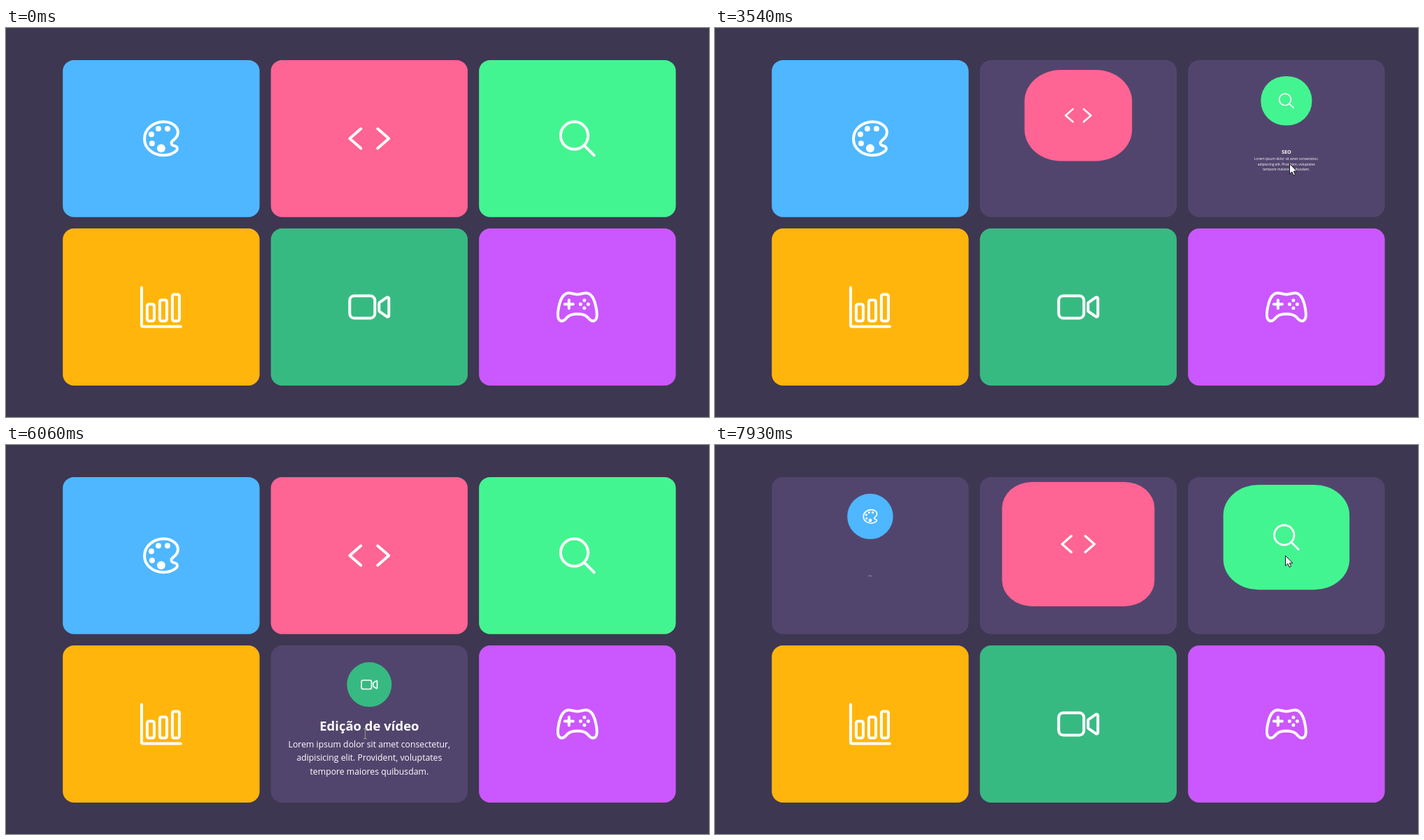
An HTML page with a canvas that plays this animation: 1005 by 557 pixels, repeating every 8 s.

```html
<!DOCTYPE html>
<html lang="pt-BR">
<head>
<meta charset="utf-8">
<title>Cards</title>
<style>
  html, body { margin: 0; width: 100%; height: 100%; overflow: hidden; background: #3e3751; }
  canvas { display: block; width: 1005px; height: 557px; }
</style>
</head>
<body>
<canvas id="stage"></canvas>
<script>
const W = 1005, H = 557, LOOP = 8000;
const DURATION = 500, DELAY = 250, GLIDE = 90;
const CARD_W = 281.3, CARD_H = 224.9, CIRCLE = 64;
const FONT = '"Open Sans", "Noto Sans", sans-serif';
const LINES = [
  'Lorem ipsum dolor sit amet consectetur,',
  'adipisicing elit. Provident, voluptates',
  'tempore maiores quibusdam.'
];

const canvas = document.getElementById('stage');
const ctx = canvas.getContext('2d');
const dpr = window.devicePixelRatio || 1;
canvas.width = W * dpr;
canvas.height = H * dpr;

// Icons are outlines and dots in a 512 unit box
function dots(r, ...centers) {
  const path = new Path2D();
  for (const [x, y] of centers) {
    path.moveTo(x + r, y);
    path.arc(x, y, r, 0, 2 * Math.PI);
  }
  return path;
}

function mirrored(d) {
  const half = new Path2D(d), path = new Path2D(half);
  path.addPath(half, new DOMMatrix([-1, 0, 0, 1, 512, 0]));
  return path;
}

function palette() {
  const line = new Path2D('M430 348c-16-15-31-5-47-19-14-13-14-31 0-44l30-27c46-41 46-108 0-149-34-30-80-45-128-45-56 0-114 20-158 60-83 74-83 195 0 268 42 37 98 55 154 55 56 0 111-18 149-52 14-13 12-36 0-47z');
  const fill = dots(32, [144, 208], [152, 311], [224, 144], [328, 144]);
  fill.addPath(dots(48, [256, 367]));
  return { line, fill };
}

function lens() {
  const line = dots(157, [221, 221]);
  line.moveTo(338, 338);
  line.lineTo(448, 448);
  return { line };
}

function chart() {
  const line = new Path2D('M32 32v432a16 16 0 0 0 16 16h432');
  [192, 240, 304].forEach((h, i) => line.roundRect(96 + 144 * i, 416 - h, 80, h, 20));
  return { line };
}

function camera() {
  const line = new Path2D('M375 309l83 58a16 16 0 0 0 22-15V160a16 16 0 0 0-22-15l-83 58a16 16 0 0 0-7 13v80a16 16 0 0 0 7 13z');
  line.roundRect(32, 128, 288, 256, 52);
  return { line };
}

function gamepad() {
  const line = mirrored('M256 112c27 0 69-16 96-16 60 0 97 65 115 153 19 86 20 151-21 165-25 8-49-10-71-38-25-31-55-40-119-40');
  line.addPath(new Path2D('M160 176v96M208 224h-96'));
  const ring = [0, 1, 2, 3].map(i => i * Math.PI / 2);
  return { line, fill: dots(20, ...ring.map(a => [336 + 44 * Math.cos(a), 224 + 44 * Math.sin(a)])) };
}

const cards = [
  { title: 'Design', color: '#4eb7ff', icon: palette() },
  { title: 'Desenvolvimento', color: '#fe6494', icon: { line: mirrored('M160 368L32 256l128-112') } },
  { title: 'SEO', color: '#43f590', icon: lens() },
  { title: 'Marketing Digital', color: '#ffb50b', icon: chart() },
  { title: 'Edição de vídeo', color: '#37ba82', icon: camera() },
  { title: 'Games', color: '#cb57ff', icon: gamepad() }
];

// Pointer tour: which card, how long, and where the pointer rests
const tour = [
  { card: 0, enter: 1010, leave: 2085, at: [250, 200] },
  { card: 1, enter: 2093, leave: 3165, at: [579, 196] },
  { card: 2, enter: 3169, leave: 4215, at: [821, 194] },
  { card: 5, enter: 4225, leave: 5170, at: [808, 376] },
  { card: 4, enter: 5185, leave: 6150, at: [514, 413] },
  { card: 3, enter: 6160, leave: 6905, at: [310, 340] },
  { card: 1, enter: 6925, leave: 7200, at: [500, 205] },
  { card: 0, enter: 7245, leave: 7690, at: [250, 166] },
  { card: 1, enter: 7710, leave: 7786, at: [540, 162] },
  { card: 2, enter: 7793, leave: LOOP, at: [815, 158] }
];
cards.forEach((card, i) => {
  card.left = 81.2 + 297.5 * (i % 3);
  card.top = i < 3 ? 45.9 : 287.1;
  card.cx = card.left + CARD_W / 2;
  card.visits = tour.filter(stop => stop.card === i);
});

const mix = (a, b, k) => a + (b - a) * k;
const clamp = k => Math.max(0, Math.min(1, k));

// CSS "ease": cubic-bezier(.25, .1, .25, 1)
function ease(x) {
  if (x <= 0 || x >= 1) return clamp(x);
  const curve = (u, a, b) => 3 * u * (1 - u) * ((1 - u) * a + u * b) + u ** 3;
  let lo = 0, hi = 1;
  for (let i = 0; i < 24; i++) {
    const mid = (lo + hi) / 2;
    if (curve(mid, 0.25, 0.25) < x) lo = mid; else hi = mid;
  }
  return curve(lo, 0.1, 1);
}

// Value of a hover transition; a reversed run is shortened as in CSS
function transition(visits, t, inDelay, outDelay) {
  let from = 0, to = 0, start = 0, factor = 1;
  const progress = s => ease((s - start) / Math.max(1, DURATION * factor));
  const toggle = (s, target, delay) => {
    const k = progress(s);
    from = mix(from, to, k);
    to = target;
    factor = k * factor + 1 - factor;
    start = s + delay;
  };
  for (const { enter, leave } of visits) {
    if (t >= enter) toggle(enter, 1, inDelay);
    if (t >= leave) toggle(leave, 0, outDelay);
  }
  return mix(from, to, progress(t));
}

function fillRound(x, y, w, h, rx, ry, color) {
  ctx.beginPath();
  ctx.roundRect(x, y, w, h, { x: rx, y: ry });
  ctx.fillStyle = color;
  ctx.fill();
}

function drawText(card, scale) {
  if (scale < 0.005) return;
  ctx.save();
  ctx.translate(card.cx, card.top + 141.5);
  ctx.scale(scale, scale);
  ctx.fillStyle = '#fff';
  ctx.textAlign = 'center';
  ctx.font = `700 18.5px ${FONT}`;
  ctx.fillText(card.title, 0, -19.5);
  ctx.font = `400 12.25px ${FONT}`;
  LINES.forEach((line, i) => ctx.fillText(line, 0, 4 + 19.5 * i));
  ctx.restore();
}

function drawIcon({ line, fill }, cx, cy, size) {
  ctx.save();
  ctx.translate(cx, cy);
  ctx.scale(size / 512, size / 512);
  ctx.translate(-256, -256);
  ctx.strokeStyle = ctx.fillStyle = '#fff';
  ctx.lineWidth = 32;
  ctx.lineCap = ctx.lineJoin = 'round';
  ctx.stroke(line);
  if (fill) ctx.fill(fill);
  ctx.restore();
}

function drawCard(card, t) {
  const { cx, top, color, icon, visits } = card;
  const open = transition(visits, t, 0, DELAY);
  fillRound(card.left, top, CARD_W, CARD_H, 16, 16, '#52456d');
  drawText(card, transition(visits, t, DELAY, 0));

  const w = mix(CARD_W, CIRCLE, open), h = mix(CARD_H, CIRCLE, open), y = top + 24 * open;
  const radius = side => mix(16, side / 2, open);
  fillRound(cx - w / 2, y, w, h, radius(w), radius(h), color);
  drawIcon(icon, cx, y + h / 2, mix(64, 25.6, open));
}

// Rest on each stop, glide between stops around the moment of leaving
function pointerAt(t) {
  if (t >= 660 && t < 730) return [14, 494];
  if (t < 1000) return null;
  const margin = stop => Math.min(GLIDE, (stop.leave - stop.enter) / 2);
  for (let i = 0; i < tour.length - 1; i++) {
    const a = tour[i], b = tour[i + 1];
    const depart = a.leave - margin(a), arrive = b.enter + margin(b);
    if (t < arrive) {
      const k = clamp((t - depart) / (arrive - depart));
      return a.at.map((v, axis) => mix(v, b.at[axis], k));
    }
  }
  return tour[tour.length - 1].at;
}

function overText([x, y], t) {
  return cards.some(({ cx, top, visits }) =>
    Math.abs(x - cx) < 115 && y > top + 105 && y < top + 190 &&
    transition(visits, t, DELAY, 0) > 0.99);
}

const arrow = new Path2D('M0 0V14.5L3.4 11.4 5.6 16.4 8 15.4 5.8 10.6H10.3z');
const beam = new Path2D('M-2.5-7H2.5M0-7V7M-2.5 7H2.5');

function drawPointer(t) {
  const at = pointerAt(t);
  if (!at) return;
  ctx.save();
  ctx.translate(Math.round(at[0]) + 0.5, Math.round(at[1]) + 0.5);
  ctx.lineWidth = 1;
  if (overText(at, t)) {
    ctx.strokeStyle = '#949b85';
    ctx.stroke(beam);
  } else {
    ctx.fillStyle = '#fff';
    ctx.strokeStyle = '#15121c';
    ctx.fill(arrow);
    ctx.stroke(arrow);
  }
  ctx.restore();
}

function render(t) {
  ctx.setTransform(dpr, 0, 0, dpr, 0, 0);
  ctx.fillStyle = '#3e3751';
  ctx.fillRect(0, 0, W, H);
  for (const card of cards) drawCard(card, t);
  drawPointer(t);
}

const begin = performance.now();
function tick() {
  render((performance.now() - begin) % LOOP);
  requestAnimationFrame(tick);
}
tick();
</script>
</body>
</html>
```
